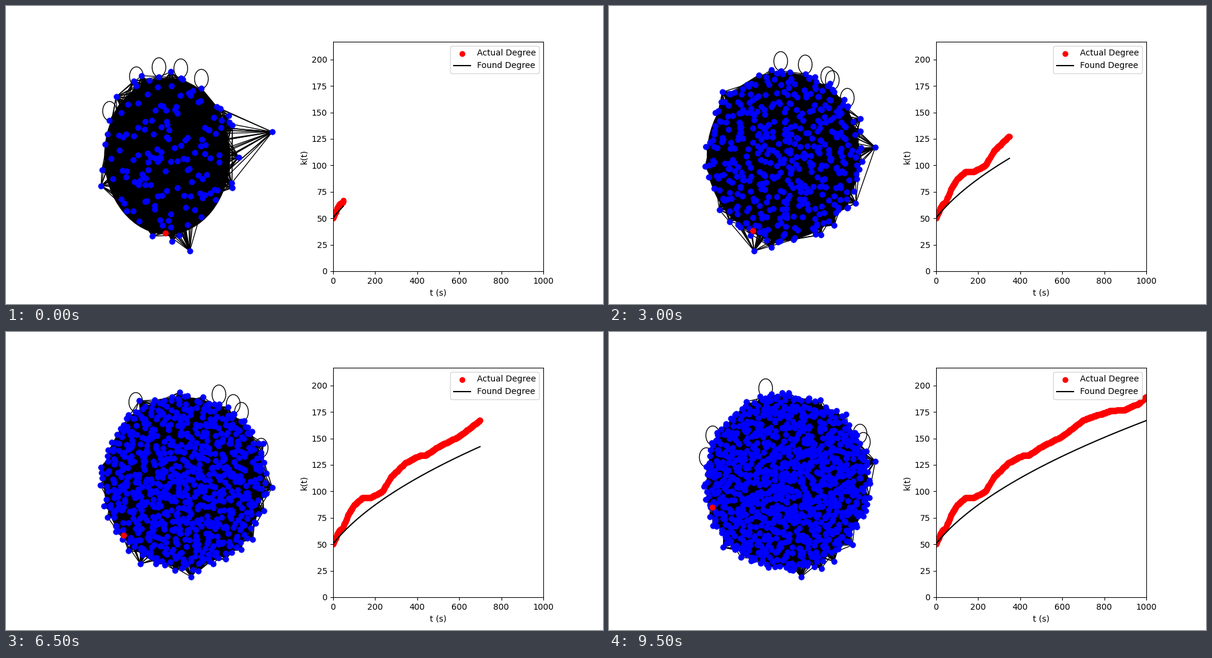
A matplotlib script for the animation above (10 s loop, 1000 by 500 pixels).

```python
import numpy as np
import matplotlib.pyplot as plt
from matplotlib.animation import FuncAnimation
from matplotlib.collections import LineCollection
from matplotlib.patches import Ellipse

FRAMES = 20
STEP = 50
START_NODES = 100
GOLDEN = np.pi * (3 - np.sqrt(5))
LEFT, RIGHT, TOP, BOTTOM = 155, 446, 93, 411

# key points (t, degree) of the tracked node
GROWTH = np.array([(0, 50), (28, 63), (45, 65), (75, 79), (100, 87), (140, 94),
                   (178, 94), (235, 100), (277, 114), (345, 127), (415, 134),
                   (440, 134), (500, 142), (600, 152), (705, 168), (830, 176),
                   (900, 177.5), (965, 183), (1000, 189.5)])


def on_ellipse(body, angle, scale=1.0):
    cx, cy, rx, ry = body
    return np.column_stack([cx + scale * rx * np.cos(angle),
                            cy + scale * ry * np.sin(angle)])


def loop_curve(node):
    a = np.linspace(0, 2 * np.pi, 40)
    return node + np.column_stack([11.5 * np.cos(a), 16 * np.sin(a) - 16])


def body_shape(frame):
    """Centre and radii; the cluster widens as nodes are added."""
    shrink = np.exp(-frame / 4)
    return 298 - 28 * shrink, 252 - 0.5 * frame / FRAMES, 140 - 30 * shrink, 149 - 12 * shrink


def build_graph(frame):
    rng = np.random.default_rng(40 + frame)
    body = body_shape(frame)
    total = START_NODES + STEP * (frame + 1)

    far = [(RIGHT, rng.normal(257, 40)), (rng.uniform(235, 340), BOTTOM)]
    rim = on_ellipse(body, rng.uniform(0, 2 * np.pi, 4), 1.06)
    looped = on_ellipse(body, rng.uniform(3.3, 6.0, 5), 0.98)
    tracked = on_ellipse(body, 1.6 + 0.065 * frame, 0.94)
    fixed = np.vstack([far, rim, looped, tracked])

    # sunflower fill, loosened everywhere but at the edge
    count = total - len(fixed)
    i = np.arange(count)
    radius = ((i + 0.5) / count) ** 0.54
    gap = np.sqrt(np.pi * body[2] * body[3] / count)
    spread = gap * (0.75 - 0.45 * radius ** 6)
    fill = on_ellipse(body, i * GOLDEN + rng.uniform(0, 6), radius)
    fill += rng.normal(0, 1, (count, 2)) * spread[:, None]
    nodes = np.clip(np.vstack([fill, fixed]), (LEFT, TOP), (RIGHT, BOTTOM))

    outer = np.flatnonzero(radius > 0.85)
    sources = np.concatenate([np.repeat(outer, 16),
                              np.repeat(np.arange(count, total), 20)])
    targets = rng.integers(0, total, len(sources))
    edges = np.stack([nodes[sources], nodes[targets]], axis=1)
    return body, nodes, list(edges) + [loop_curve(p) for p in looped]


fig = plt.figure(figsize=(10, 5), dpi=100)

net = fig.add_axes([0, 0, 1, 1])
net.set(xlim=(0, 1000), ylim=(500, 0))
net.axis("off")
core = net.add_patch(Ellipse((0, 0), 1, 1, color="black", lw=0, zorder=1))
links = net.add_collection(LineCollection([], colors="black", linewidths=1, zorder=1.5))
dots = net.scatter([], [], s=50, c="blue", linewidths=0.2, zorder=2)
marked = net.scatter([], [], s=50, c="red", linewidths=0.2, zorder=3)

chart = fig.add_subplot(122)
actual = chart.scatter([], [], c="red", linewidths=1, label="Actual Degree")
found, = chart.plot([], [], color="black", label="Found Degree")
chart.set(xlim=(0, 1000), ylim=(0, 216.7), xlabel="t (s)", ylabel="k(t)")
chart.legend(loc="upper right")


def update(frame):
    body, nodes, lines = build_graph(frame)
    core.set_center(body[:2])
    core.width, core.height = 1.92 * body[2], 1.92 * body[3]
    links.set_segments(lines)
    dots.set_offsets(nodes[:-1])
    marked.set_offsets(nodes[-1:])

    t = np.arange(STEP * (frame + 1))
    degree = np.floor(np.interp(t, *GROWTH.T) + 0.4)
    actual.set_offsets(np.column_stack([t, degree]))
    found.set_data(t, 50.3 * np.sqrt(1 + t / 100))
    return core, links, dots, marked, actual, found


anim = FuncAnimation(fig, update, frames=FRAMES, interval=500,
                     repeat=True, repeat_delay=0, blit=False)
plt.show()
```
